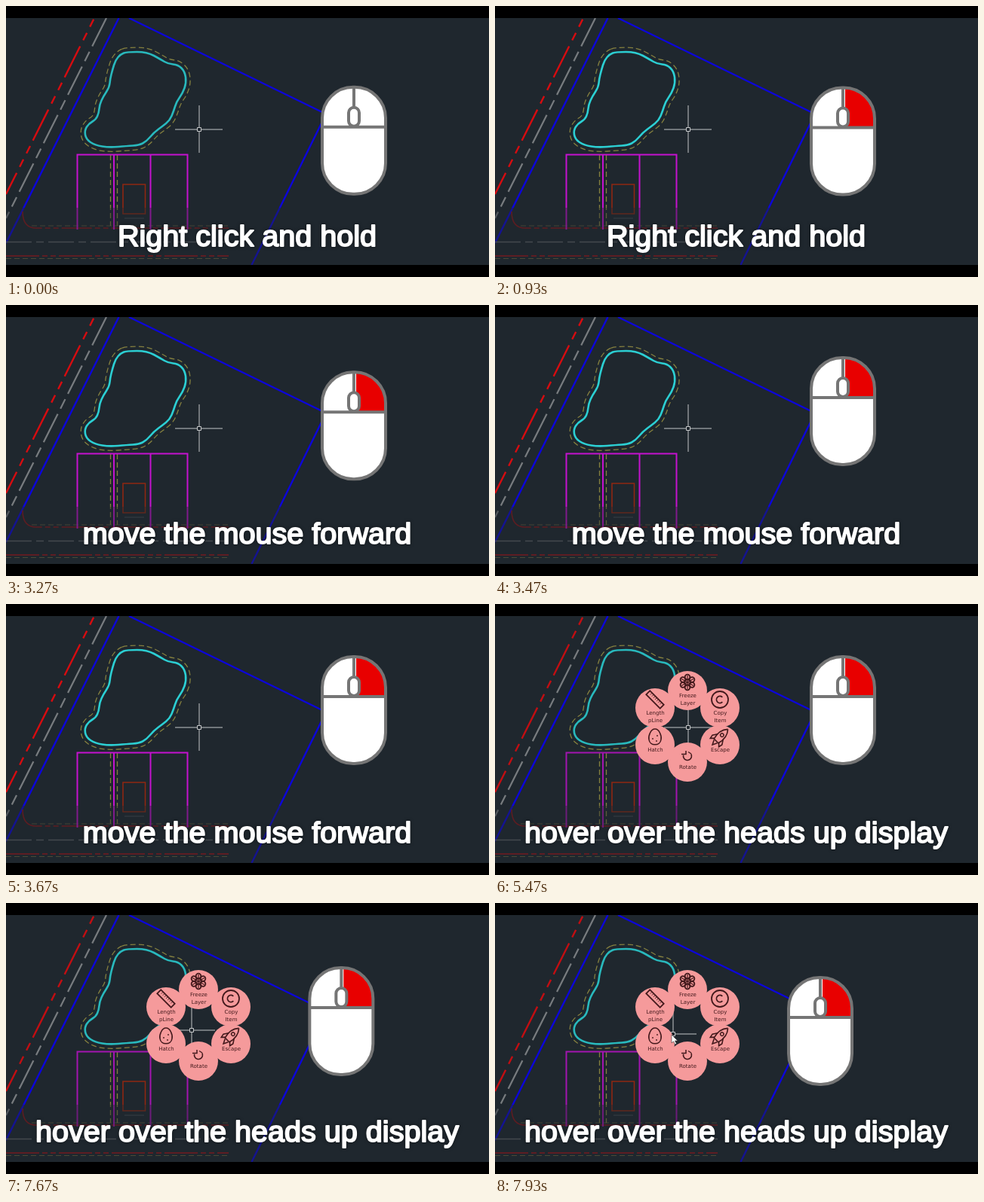
Write an HTML page with a canvas that moves like this. It is 640 px wide and 360 px high and loops after 8000 ms.

```html
<!DOCTYPE html>
<html lang="en">
<head>
<meta charset="utf-8">
<title>Heads up display demo</title>
<style>
html, body { margin: 0; width: 100%; height: 100%; overflow: hidden; background: #000; }
canvas { display: block; }
</style>
</head>
<body>
<canvas id="stage" width="640" height="360"></canvas>
<script>
const ctx = document.getElementById('stage').getContext('2d');
const LOOP = 8000, FPS = 15;
const GROUND = '#1f272e', INK = '#43191c', PINK = '#f59a9b', GREY = '#757575';
const YELLOW = '#85803f', BLUE = '#0c05db', DARK_RED = '#8c1418';

// Clockwise outline.
const pond = [
  [160, 61], [187, 61], [205, 71], [215, 77], [228, 78], [237, 87], [239, 102], [234, 116],
  [226, 127], [222, 140], [217, 152], [207, 160], [196, 168], [186, 180], [176, 185], [160, 186],
  [137, 188], [118, 185], [106, 177], [104, 165], [110, 156], [119, 151], [123, 142], [124, 131],
  [129, 120], [137, 108], [138, 97], [141, 85], [145, 72], [152, 64]
];
const pondBuffer = offset(pond, 6);

const clamp = v => Math.max(0, Math.min(1, v));
const mix = (a, b, k) => a + (b - a) * k;

// Push a clockwise outline outwards along its normals.
function offset(points, d) {
  const n = points.length;
  return points.map(([x, y], i) => {
    const [ax, ay] = points[(i + n - 1) % n], [bx, by] = points[(i + 1) % n];
    const len = Math.hypot(bx - ax, by - ay);
    return [x + (by - ay) / len * d, y - (bx - ax) / len * d];
  });
}

function stroke(color, width, dash = [], dashOffset = 0) {
  ctx.strokeStyle = color;
  ctx.lineWidth = width;
  ctx.setLineDash(dash);
  ctx.lineDashOffset = dashOffset;
  ctx.stroke();
  ctx.setLineDash([]);
}

function line(points, color, width, dash, dashOffset) {
  ctx.beginPath();
  points.forEach(([x, y]) => ctx.lineTo(x, y));
  stroke(color, width, dash, dashOffset);
}

function blob(points, color, width, dash) {
  const mid = (a, b) => [(a[0] + b[0]) / 2, (a[1] + b[1]) / 2];
  ctx.beginPath();
  ctx.moveTo(...mid(points[points.length - 1], points[0]));
  points.forEach((p, i) => ctx.quadraticCurveTo(...p, ...mid(p, points[(i + 1) % points.length])));
  ctx.closePath();
  stroke(color, width, dash);
}

function circle(x, y, r) {
  ctx.beginPath();
  ctx.arc(x, y, r, 0, 2 * Math.PI);
}

function drawing(t) {
  const menuOpen = t >= 5470;
  const cyan = t >= 930 && !menuOpen ? '#2ccfd3' : '#29b9bd';
  const magenta = menuOpen ? '#a315b0' : '#c512cf';
  const red = menuOpen ? '#c20e12' : '#d70c10';

  ctx.fillStyle = GROUND;
  ctx.fillRect(0, 16, 640, 328);

  line([[117, 16], [0, 250]], red, 2.4, [46, 8, 11, 9, 11, 9], 52);
  line([[133, 16], [0, 282]], '#787c7f', 2.2, [42, 8, 14, 8]);
  line([[149.5, 16], [0, 315]], BLUE, 2.4);
  line([[163, 16], [424, 143.5], [325.5, 344]], BLUE, 2.4);

  line([[34, 292], [295, 292]], '#5c5938', 1, [7, 4]);
  ctx.beginPath();
  ctx.moveTo(22, 273);
  ctx.quadraticCurveTo(22, 295, 40, 295);
  ctx.lineTo(295, 295);
  stroke(DARK_RED, 1.5, [40, 4, 7, 4, 7, 4]);
  line([[0, 313.5], [295, 313.5]], '#5d6265', 1.3, [34, 6, 10, 6]);
  line([[0, 332], [295, 332]], '#b01216', 1.6, [44, 4, 7, 4, 7, 4]);
  line([[0, 335.5], [295, 335.5]], '#67643c', 1, [7, 4]);

  for (const x of [138.5, 147.5]) line([[x, 198], [x, 292]], YELLOW, 1.3, [7, 4]);
  line([[94.5, 297], [94.5, 197.5], [240.5, 197.5], [240.5, 297]], magenta, 2);
  for (const x of [143, 191.5]) line([[x, 197], [x, 297]], magenta, 2);
  ctx.beginPath();
  ctx.rect(155, 237, 29.5, 39);
  stroke('#8e2712', 1.6);
  line([[157, 282], [183, 282]], '#4b5054', 1);

  blob(pondBuffer, YELLOW, 1.3, [7, 4]);
  blob(pond, cyan, 2.6);
}

function crosshair(x, y) {
  const grey = '#969a9c';
  line([[x - 32, y], [x - 3, y]], grey, 1.4);
  line([[x + 3, y], [x + 31, y]], grey, 1.4);
  line([[x, y - 32], [x, y - 3]], grey, 1.4);
  line([[x, y + 3], [x, y + 31]], grey, 1.4);
  ctx.beginPath();
  ctx.rect(x - 2.5, y - 2.5, 5, 5);
  stroke('#c5c7c8', 1);
}

function arrow(x, y) {
  ctx.beginPath();
  [[0, 0], [0, 11], [2.6, 8.8], [4.6, 13], [6.4, 12], [4.5, 8], [8, 8]]
    .forEach(([dx, dy]) => ctx.lineTo(x + dx, y + dy));
  ctx.closePath();
  ctx.fillStyle = '#fff';
  ctx.fill();
  stroke('#333', 0.6);
}

const icons = {
  flake() {
    for (let i = 0; i < 6; i++) {
      const a = i * Math.PI / 3 + Math.PI / 6;
      circle(7 * Math.cos(a), 7 * Math.sin(a), 3.3);
      stroke(INK, 1.8);
      line([[0, 0], [9 * Math.cos(a), 9 * Math.sin(a)]], INK, 1.2);
    }
    circle(0, 0, 3.5);
    stroke(INK, 1.6);
  },
  copy() {
    circle(0, 0, 11);
    stroke(INK, 1.8);
    ctx.beginPath();
    ctx.arc(0, 0, 4.5, 0.75, 5.53);
    stroke(INK, 1.8);
  },
  rocket() {
    ctx.rotate(Math.PI / 4);
    ctx.beginPath();
    ctx.moveTo(0, -15);
    ctx.quadraticCurveTo(8, -6, 4, 7);
    ctx.lineTo(-4, 7);
    ctx.quadraticCurveTo(-8, -6, 0, -15);
    stroke(INK, 1.6);
    circle(0, -4, 2.2);
    stroke(INK, 1.4);
    line([[-5, -1], [-9, 5], [-8, 10], [-4, 6]], INK, 1.6);
    line([[5, -1], [9, 5], [8, 10], [4, 6]], INK, 1.6);
    line([[-3, 8], [0, 14], [3, 8]], INK, 1.6);
  },
  rotate() {
    ctx.beginPath();
    ctx.arc(0, 0, 5.5, -0.5, 3.4);
    stroke(INK, 1.6);
    line([[-8, -2.5], [-2, -2.5], [-2, -7]], INK, 1.5);
    line([[1, -5.5], [5, -3]], INK, 1.4);
  },
  egg() {
    ctx.beginPath();
    ctx.moveTo(0, -10);
    ctx.bezierCurveTo(6, -10, 9, 0, 8, 4);
    ctx.bezierCurveTo(7, 13, -7, 13, -8, 4);
    ctx.bezierCurveTo(-9, 0, -6, -10, 0, -10);
    stroke(INK, 1.6);
    for (const [x, y] of [[-3, 3], [2, 6], [3, -1]]) {
      circle(x, y, 0.9);
      ctx.fillStyle = INK;
      ctx.fill();
    }
  },
  ruler() {
    ctx.rotate(Math.PI / 4);
    ctx.beginPath();
    ctx.rect(-13, -3.5, 26, 7);
    stroke(INK, 1.8);
    for (let x = -9; x <= 9; x += 3) line([[x, -3], [x, 0]], INK, 0.8);
  }
};

const items = [
  [255, 115, 'flake', -11, 'Freeze', 'Layer'],
  [298, 138, 'copy', -11, 'Copy', 'Item'],
  [298, 187, 'rocket', -10, 'Escape'],
  [255, 210, 'rotate', -8, 'Rotate'],
  [212, 187, 'egg', -11, 'Hatch'],
  [212, 138, 'ruler', -11, 'Length', 'pLine']
];

function menu() {
  ctx.fillStyle = PINK;
  for (const [x, y] of items) {
    circle(x, y, 26);
    ctx.fill();
  }
  ctx.font = '7px "DejaVu Sans", sans-serif';
  for (const [x, y, icon, dy, ...label] of items) {
    ctx.save();
    ctx.translate(x, y + dy);
    icons[icon]();
    ctx.restore();
    ctx.fillStyle = INK;
    label.forEach((word, i) => ctx.fillText(word, x + 0.5, y + 8.5 + i * 10));
  }
}

function mouse(x, y, pressed) {
  ctx.save();
  ctx.translate(x, y);
  ctx.beginPath();
  ctx.roundRect(-42, -71, 84, 142, 41);
  ctx.fillStyle = '#fff';
  ctx.fill();
  if (pressed) {
    ctx.save();
    ctx.clip();
    ctx.fillStyle = '#e80000';
    ctx.fillRect(3, -72, 42, 54);
    ctx.restore();
  }
  stroke(GREY, 4);
  line([[-42, -18], [42, -18]], GREY, 4);
  line([[0, -71], [0, -44]], GREY, 4);
  ctx.beginPath();
  ctx.roundRect(-7, -44, 14, 25, 7);
  ctx.fillStyle = '#fff';
  ctx.fill();
  stroke(GREY, 4);
  ctx.restore();
}

function caption(text, y) {
  ctx.font = '39.6px "Liberation Sans", Arial, sans-serif';
  ctx.lineJoin = 'round';
  ctx.save();
  ctx.shadowColor = 'rgba(0,0,0,.6)';
  ctx.shadowBlur = 4;
  ctx.strokeStyle = ctx.fillStyle = '#fff';
  ctx.lineWidth = 2;
  ctx.strokeText(text, 319.5, y);
  ctx.restore();
  ctx.fillStyle = '#fff';
  ctx.fillText(text, 319.5, y);
  ctx.lineJoin = 'miter';
}

function render(t) {
  const step = Math.floor((t + 5) * FPS / 1000);
  const settle = clamp(step / 4);
  const forward = clamp((step - 46) / 6);
  const drag = clamp((step - 110) / 9);
  const hover = clamp((step - 111) / 8);
  const menuOpen = t >= 5470;

  ctx.textAlign = 'center';
  ctx.textBaseline = 'alphabetic';
  drawing(t);

  // Dim strip behind the caption.
  ctx.fillStyle = 'rgba(31,39,46,.42)';
  ctx.fillRect(0, 268, 640, 76);

  const cx = Math.round(mix(256, 236, hover));
  const cy = Math.round(mix(164, 174, hover));
  crosshair(cx, cy);
  if (menuOpen) menu();
  if (step >= 118) arrow(cx - 2, cy + 1);

  const baseY = mix(mix(178.8, 179.5, settle), 141, forward);
  mouse(mix(461, 431, drag), mix(baseY, 170, drag), t >= 930);

  if (t < 2730) caption('Right click and hold', 319);
  else caption(menuOpen ? 'hover over the heads up display' : 'move the mouse forward', 317);

  ctx.fillStyle = '#000';
  ctx.fillRect(0, 0, 640, 16);
  ctx.fillRect(0, 344, 640, 16);
}

const start = performance.now();
function tick() {
  render((performance.now() - start) % LOOP);
  requestAnimationFrame(tick);
}
tick();
</script>
</body>
</html>
```
